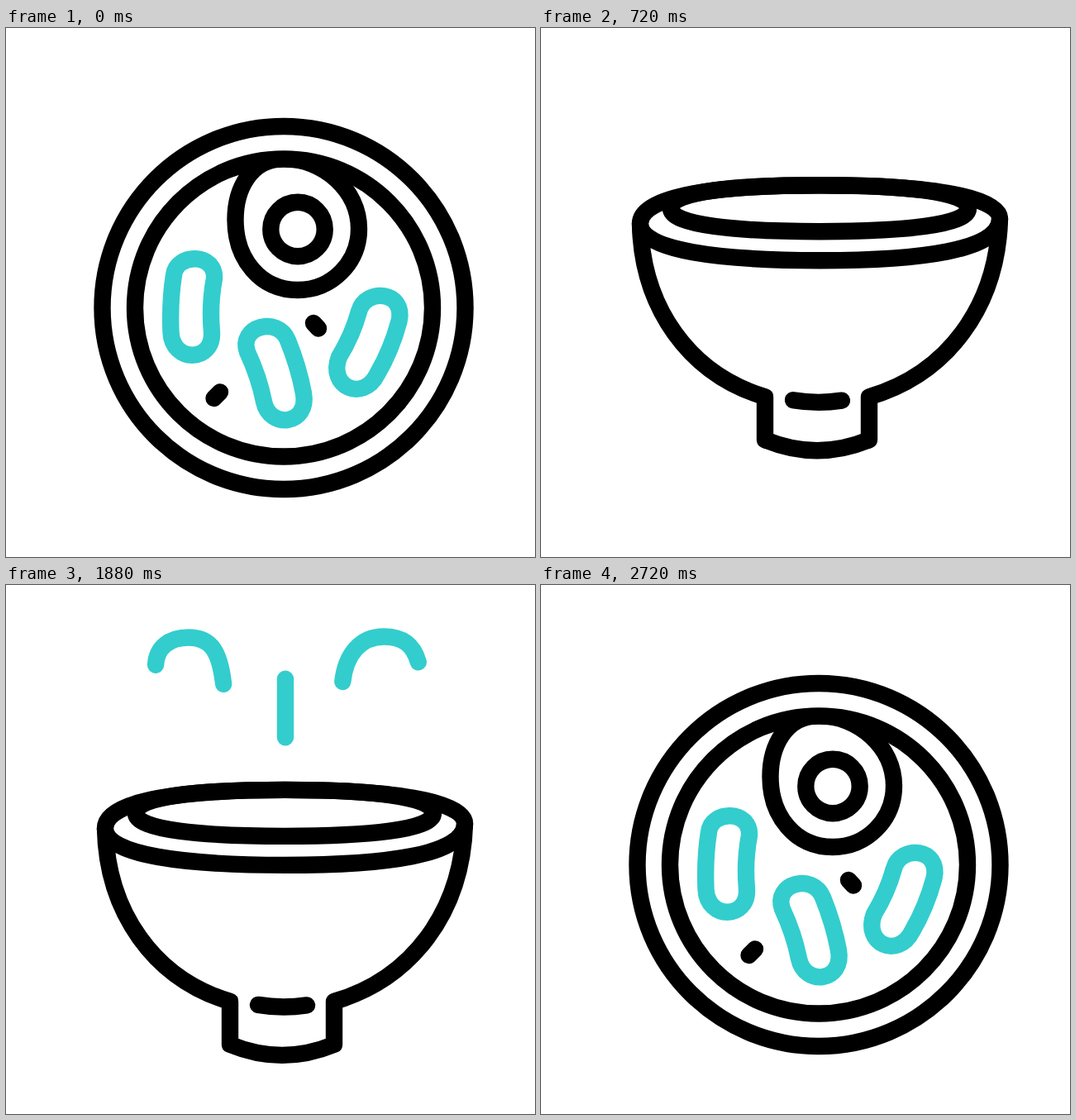
Recreate the animation shown at these times as an HTML page. Size 640 by 640 pixels, loop 3.6 s.

```html
<!DOCTYPE html>
<html lang="en">
<head>
<meta charset="utf-8">
<title>Bowl of soup</title>
<style>
  html, body { margin: 0; width: 100%; height: 100%; overflow: hidden; background: #fff; }
  svg { display: block; width: 100%; height: 100%; }
  .ink, .cyan { fill: none; stroke: #000; stroke-width: 20.4; stroke-linecap: round; stroke-linejoin: round; }
  .cyan { stroke: #33cdcd; }
  .solid { fill: #fff; }
</style>
</head>
<body>
<svg viewBox="0 0 640 640">
  <defs>
    <clipPath id="opening"><path class="inner"/></clipPath>
  </defs>
  <path id="body" class="ink solid"/>
  <path id="dash" class="ink"/>
  <path id="rim" class="ink solid"/>
  <g clip-path="url(#opening)">
    <g id="food">
      <path class="ink solid" d="M336 158C296 158 277.5 195 277.5 232C277.5 280 308 317 353 317C394 317 427 284 427 243C427 196 384 158 336 158Z"/>
      <circle class="ink" cx="353" cy="243.5" r="32.7"/>
      <path class="cyan" d="M203 299C206 272 254 272 252 303Q246 335 249 368C251 405 201 405 199.5 368Q198 330 203 299Z"/>
      <path class="cyan" d="M292 392C281 361 329 348 341 378Q354 410 360 442C367 480 319 486 312 452Q306 422 292 392Z"/>
      <path class="cyan" d="M427 343C435 314 484 318 475.5 355Q466 390 449 419C432 453 389 434 403 398Q419 372 427 343Z"/>
      <path class="ink" d="M372 357L378 363.5M259 440.5L251.500 448"/>
    </g>
  </g>
  <path class="inner ink"/>
  <g id="steam">
    <path class="cyan" pathLength="1" d="M264 257C266 212 268 160 263.5 123C259 80 248 63.5 221 63.5C196 63.5 181 77 181 99C181 122 198 131 213 131C230 131 236 122 236 112C236 100 230 94 216 94"/>
    <path class="cyan" pathLength="1" d="M338 255V53"/>
    <path class="cyan" pathLength="1" d="M412 255C409 210 405 160 407 120C410 85 428 62.5 457 62.5C480 62.5 493 72 499 94C502 108 499 113 491 119C483 128 473 133.5 461 133.5C447 133.5 440 125 440 117C440 107 447 102 457 102"/>
  </g>
</svg>
<script>
const LOOP = 3600, STEP = 20, REST_Y = 338.5, ROUND = 0.5523;

// Keys are [time, value, slope]; a missing slope means an eased stop.
const tilt = [[0, 1], [540, 0], [2110, 0], [2700, 1]];
const height = [[30, REST_Y], [480, 283.5, -0.195], [870, 222.5], [1360, 272.5, 0.145],
                [1740, 309], [2220, 233], [2700, REST_Y]];
const steamHead = [[1100, 0], [1360, 0.116, 0.0009], [1620, 0.43, 0.00115], [1880, 0.7, 0.00095], [2300, 1]];
const steamTail = [[1370, 0], [2650, 1]];

const $ = id => document.getElementById(id);
const inners = document.querySelectorAll('.inner');
const wisps = $('steam').children;

function sample(keys, time) {
  if (time <= keys[0][0]) return keys[0][1];
  const i = keys.findIndex(key => key[0] > time);
  if (i < 0) return keys[keys.length - 1][1];
  const [t0, v0, m0 = 0] = keys[i - 1], [t1, v1, m1 = 0] = keys[i];
  const span = t1 - t0, u = (time - t0) / span, ease = u * u * (3 - 2 * u);
  return v0 + (v1 - v0) * ease + span * u * (1 - u) * (m0 * (1 - u) - m1 * u);
}

// Closed oval; "full" sets how square its ends are, "left" and "right" their heights.
function oval(cx, cy, rx, ry, full, left = cy, right = cy) {
  const x0 = cx - rx, x1 = cx + rx, h0 = cx - rx * ROUND, h1 = cx + rx * ROUND;
  const top = cy - ry, bottom = cy + ry, up = cy - ry * full, down = cy + ry * full;
  return `M${x0} ${left}C${x0} ${up} ${h0} ${top} ${cx} ${top}S${x1} ${up} ${x1} ${right}` +
         `C${x1} ${down} ${h1} ${bottom} ${cx} ${bottom}S${x0} ${down} ${x0} ${left}Z`;
}

function draw(time) {
  const p = sample(tilt, time), cy = sample(height, time);
  const mix = (side, top) => side + (top - side) * p;
  const y = (side, top) => cy + mix(side, top);

  const left = y(1, 0), right = y(-5, 0), full = mix(0.74, ROUND);
  $('rim').setAttribute('d',
    oval(mix(337.5, 336), cy, mix(217.5, 219.5), mix(45.5, 219.5), full, left, right));
  const opening = oval(mix(337, 336), y(-17.5, 0), 180, mix(28, 180), full);
  inners.forEach(node => node.setAttribute('d', opening));

  const high = y(102, 26), low = y(183, 48), neck = y(210.5, 55), foot = y(262.5, 25);
  $('body').setAttribute('d',
    `M120 ${left}C122 ${high} 179 ${low} 271 ${neck}V${foot}` +
    `Q334 ${y(288.5, -12)} 397 ${foot}V${neck}C491 ${low} 552 ${high} 555 ${right}`);
  const mark = y(214.5, 57);
  $('dash').setAttribute('d', `M305 ${mark}Q334 ${mark + 5} 364 ${mark + 0.5}`);

  $('food').setAttribute('transform', `translate(${mix(-22, 0)} ${cy - REST_Y + mix(232, 0)})`);

  const head = sample(steamHead, time), tail = sample(steamTail, time);
  $('steam').style.display = head - tail > 0.001 ? '' : 'none';
  for (const wisp of wisps) {
    wisp.setAttribute('stroke-dasharray', `${Math.max(0, head - tail)} 3`);
    wisp.setAttribute('stroke-dashoffset', -tail);
  }
}

const start = performance.now();
function tick() {
  const time = (performance.now() - start) % LOOP;
  draw(Math.floor(time / STEP) * STEP);
  requestAnimationFrame(tick);
}
tick();
</script>
</body>
</html>
```
